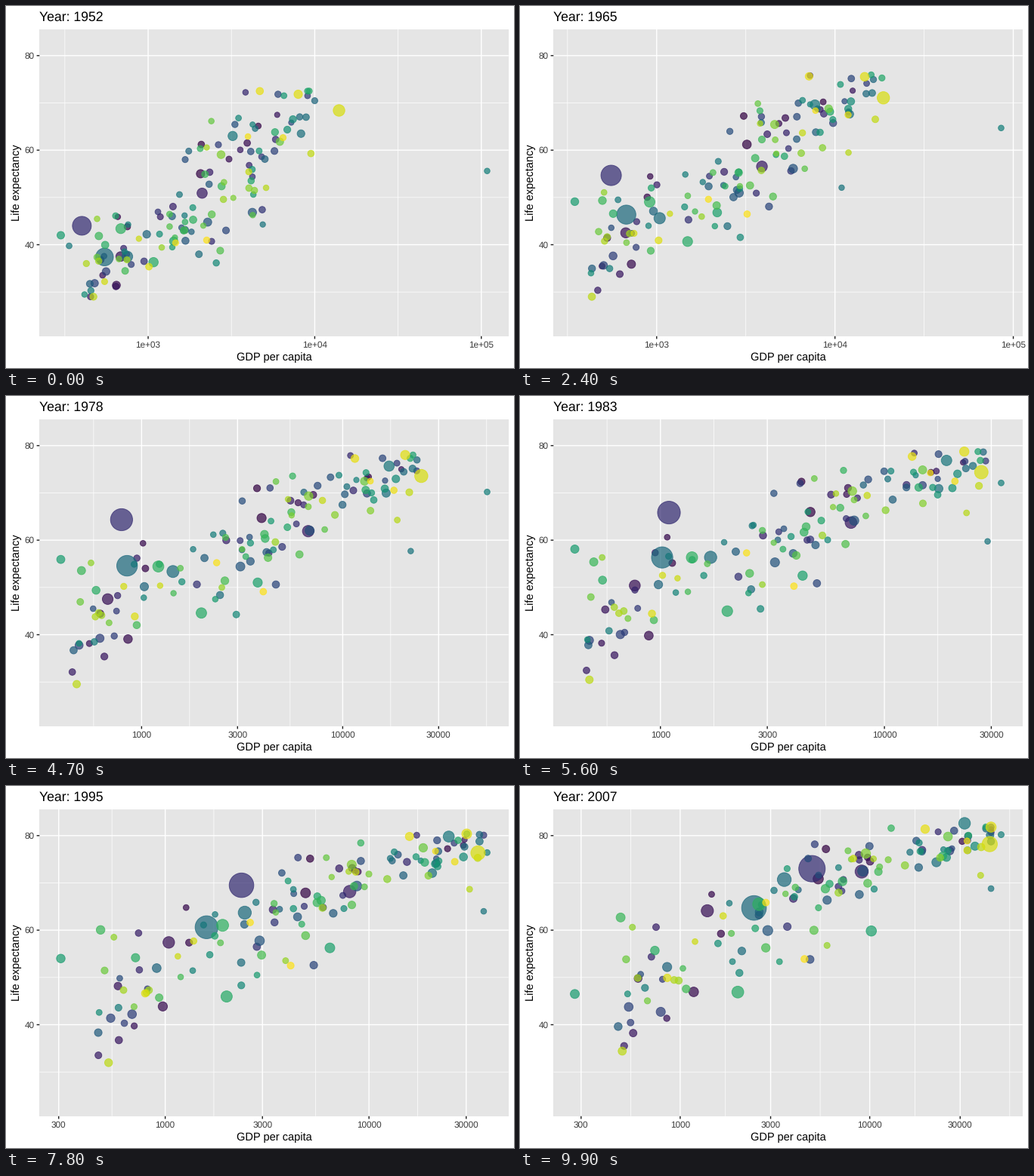
Write a matplotlib script that moves like this. It is 672x480 px and loops after 10000 ms.

```python
import numpy as np
import matplotlib.pyplot as plt
from matplotlib.animation import FuncAnimation
from matplotlib.collections import LineCollection
from matplotlib.patches import Rectangle

W, H, DPI = 672, 480, 96
FRAMES, STEP = 100, 9
LEFT, RIGHT, TOP, BOTTOM = 44.3, 664.67, 31, 437.8
LIFE_LO, LIFE_HI = 20.65, 85.55
YEARS = np.arange(1952, 2008, 5)
N = 142
plt.rcParams["font.family"] = "Liberation Sans"
plt.rcParams["text.hinting"] = "none"
rng = np.random.default_rng(7)

# Leading bubbles: hue, population, then (income, life) in 1952, 1977, 2007
LEADERS = [
    (24, 1319, (400, 44), (741, 64), (4959, 73)),
    (58, 1110, (547, 37.4), (813, 54.2), (2452, 64.7)),
    (134, 301, (13990, 68.4), (24073, 73.4), (42952, 78.2)),
    (59, 224, (750, 37.5), (1383, 52.7), (3541, 70.7)),
    (14, 190, (2109, 50.9), (6660, 61.5), (9066, 72.4)),
    (97, 169, (685, 43.4), (1176, 54), (2606, 65.5)),
    (8, 150, (684, 37.5), (660, 46.9), (1391, 64.1)),
    (94, 135, (1077, 36.3), (1982, 44.5), (2014, 46.9)),
    (66, 127, (3217, 63), (16610, 75.4), (31656, 82.6)),
]

# Clouds: count, skew, then (start, end) of income mean and sd, life mean and sd
CLOUDS = [
    (49, .25, (2.97, 3.16), (.26, .38), (39.5, 54.5), (5, 8)),
    (22, 0, (3.50, 3.92), (.22, .24), (53.5, 73), (8, 4)),
    (28, 0, (3.20, 3.84), (.34, .45), (48, 71), (8, 6)),
    (32, -.25, (3.72, 4.37), (.22, .23), (65, 77.8), (5.5, 2.6)),
]
CORR = .55


def keyed(years, values):
    return np.interp(YEARS, years, values)


def eased(ends):
    """Quick rise at first that levels off later."""
    start, end = ends
    return start + (end - start) * ((YEARS - 1952) / 55) ** .7


# Poorest and richest income (log10) set the range of the axis
LOW = keyed((1952, 1957, 1972, 1982, 1992, 2002, 2007),
            np.log10([299, 336, 357, 424, 347, 241, 278]))
HIGH = keyed((1952, 1962, 1967, 1972, 1977, 1982, 1987, 2007),
             np.log10([108382, 95458, 80895, 109348, 59265, 33693, 31541, 49357]))


def drift(z):
    """Slow turn from one random standing to another."""
    turn = np.linspace(0, .6, len(YEARS))
    return z[0] * np.cos(turn) + z[1] * np.sin(turn)


def cloud(count, skew, income, income_sd, life, life_sd):
    cap, ceiling = eased((4.14, 4.64)), eased((72.5, 81.8))
    for _ in range(count):
        z = np.clip(rng.normal(size=(2, 2)), -2, 2)
        a, b = drift(z[0]), drift(z[1])
        b = CORR * a + np.sqrt(1 - CORR ** 2) * b
        a = a + skew * (a ** 2 - 1)
        g = eased(income) + eased(income_sd) * a + rng.normal(0, .025, len(YEARS))
        l = eased(life) + eased(life_sd) * b + rng.normal(0, .4, len(YEARS))
        pop = np.clip(np.exp(rng.normal(2.2, 1.1)), .3, 80)
        yield pop, np.clip(g, LOW + .05, cap), np.clip(l, 29, ceiling)


def build():
    """Hue, income (log10), life and radius for every bubble and year."""
    rows = [
        (87, 45, LOW, keyed((1952, 1982, 1992, 2002, 2007), (42, 58, 59, 44, 46.5))),
        (71, 3, HIGH, eased((55.6, 80.2))),
    ]
    for hue, pop, *points in LEADERS:
        income, life = zip(*points)
        keys = (1952, 1977, 2007)
        rows.append((hue, pop, keyed(keys, np.log10(income)), keyed(keys, life)))

    used = {row[0] for row in rows}
    spare = list(rng.permutation([h for h in range(N) if h not in used]))
    for spec in CLOUDS:
        rows += [(spare.pop(), *bubble) for bubble in cloud(*spec)]

    rows.sort(key=lambda row: row[0])
    hue, pop, gdp, life = map(np.array, zip(*rows))
    pops = pop[:, None] * 2.4 ** ((YEARS - 2007) / 55)
    radius = 1.4225 * (2 + 10 * np.sqrt(pops / 1319)) + .47
    return hue, gdp, life, radius


def y_px(life):
    return TOP + (LIFE_HI - life) * (BOTTOM - TOP) / (LIFE_HI - LIFE_LO)


def breaks(lo, hi):
    """Major breaks, minor breaks and labels of the log axis."""
    decades = np.arange(2, 6)
    major = decades[(decades >= lo) & (decades <= hi)].astype(float)
    if len(major) >= 3:
        labels = [f"1e+{int(m):02d}" for m in major]
    else:
        cand = np.sort(np.r_[decades, decades + np.log10(3)])
        major = cand[(cand >= lo) & (cand <= hi)]
        labels = [f"{10 ** m:.0f}" for m in major]
    gap = major[1] - major[0]
    ext = np.r_[major[0] - gap, major, major[-1] + gap]
    minor = (ext[1:] + ext[:-1]) / 2
    return major, minor[(minor > lo) & (minor < hi)], labels


def vlines(xs, y0, y1):
    return [((x, y0), (x, y1)) for x in xs]


def hlines(ys, x0, x1):
    return [((x0, y), (x1, y)) for y in ys]


def px(width):
    return width * 72 / DPI


hue, gdp, life, radius = build()

fig = plt.figure(figsize=(W / DPI, H / DPI), dpi=DPI, facecolor="white")
ax = fig.add_axes([0, 0, 1, 1])
ax.set(xlim=(0, W), ylim=(H, 0))
ax.axis("off")
ax.add_patch(Rectangle((LEFT, TOP), RIGHT - LEFT, BOTTOM - TOP,
                       fc="#e5e5e5", lw=0, zorder=0))


def line_set(width, color, z):
    lines = LineCollection([], linewidths=px(width), colors=color,
                           zorder=z, capstyle="butt", snap=False)
    ax.add_collection(lines, autolim=False)
    return lines


minor_grid = line_set(.71, "white", 1)
major_grid = line_set(1.42, "white", 2)
ticks = line_set(1.42, "#222222", 2)

majors_y = y_px(np.array([40, 60, 80]))
minors_y = y_px(np.array([30, 50, 70]))
small = dict(fontsize=8.8, color="#3d3d3d", va="baseline")
for y, value in zip(majors_y, (40, 60, 80)):
    ax.text(37.7, y + 4.2, str(value), ha="right", **small)
x_labels = [ax.text(0, 452.8, "", ha="center", **small) for _ in range(7)]

title = ax.text(LEFT, 20, "", fontsize=13.2, va="baseline")
names = dict(fontsize=11, ha="center", va="baseline", rotation_mode="anchor")
ax.text((LEFT + RIGHT) / 2, 469.5, "GDP per capita", **names)
ax.text(17.9, (TOP + BOTTOM) / 2, "Life expectancy", rotation=90, **names)

colors = plt.get_cmap("viridis")(hue / (N - 1))
colors[:, :3] **= 1.25
colors[:, 3] = .7
dots = ax.scatter(np.zeros(N), np.zeros(N), s=1, c=colors,
                  edgecolors=colors, linewidths=px(.945), zorder=3)


def draw(frame):
    k = min(frame // STEP, len(YEARS) - 2)
    t = frame / STEP - k
    x, y, r = (v[:, k] * (1 - t) + v[:, k + 1] * t for v in (gdp, life, radius))

    pad = .05 * (x.max() - x.min())
    lo, hi = x.min() - pad, x.max() + pad

    def x_px(v):
        return LEFT + (v - lo) / (hi - lo) * (RIGHT - LEFT)

    major, minor, labels = breaks(lo, hi)
    xs = x_px(major)
    minor_grid.set_segments(vlines(x_px(minor), TOP, BOTTOM)
                            + hlines(minors_y, LEFT, RIGHT))
    major_grid.set_segments(vlines(xs, TOP, BOTTOM)
                            + hlines(majors_y, LEFT, RIGHT))
    ticks.set_segments(vlines(xs, BOTTOM, BOTTOM + 3.67)
                       + hlines(majors_y, LEFT - 3.67, LEFT))
    for i, label in enumerate(x_labels):
        shown = i < len(xs)
        label.set_text(labels[i] if shown else "")
        label.set_x(xs[i] if shown else 0)

    dots.set_offsets(np.c_[x_px(x), y_px(y)])
    dots.set_sizes(px(2 * r) ** 2)
    title.set_text(f"Year: {round(1952 + 55 * frame / (FRAMES - 1))}")
    return [dots, title]


anim = FuncAnimation(fig, draw, frames=FRAMES, interval=100, repeat=True)
plt.show()
```
